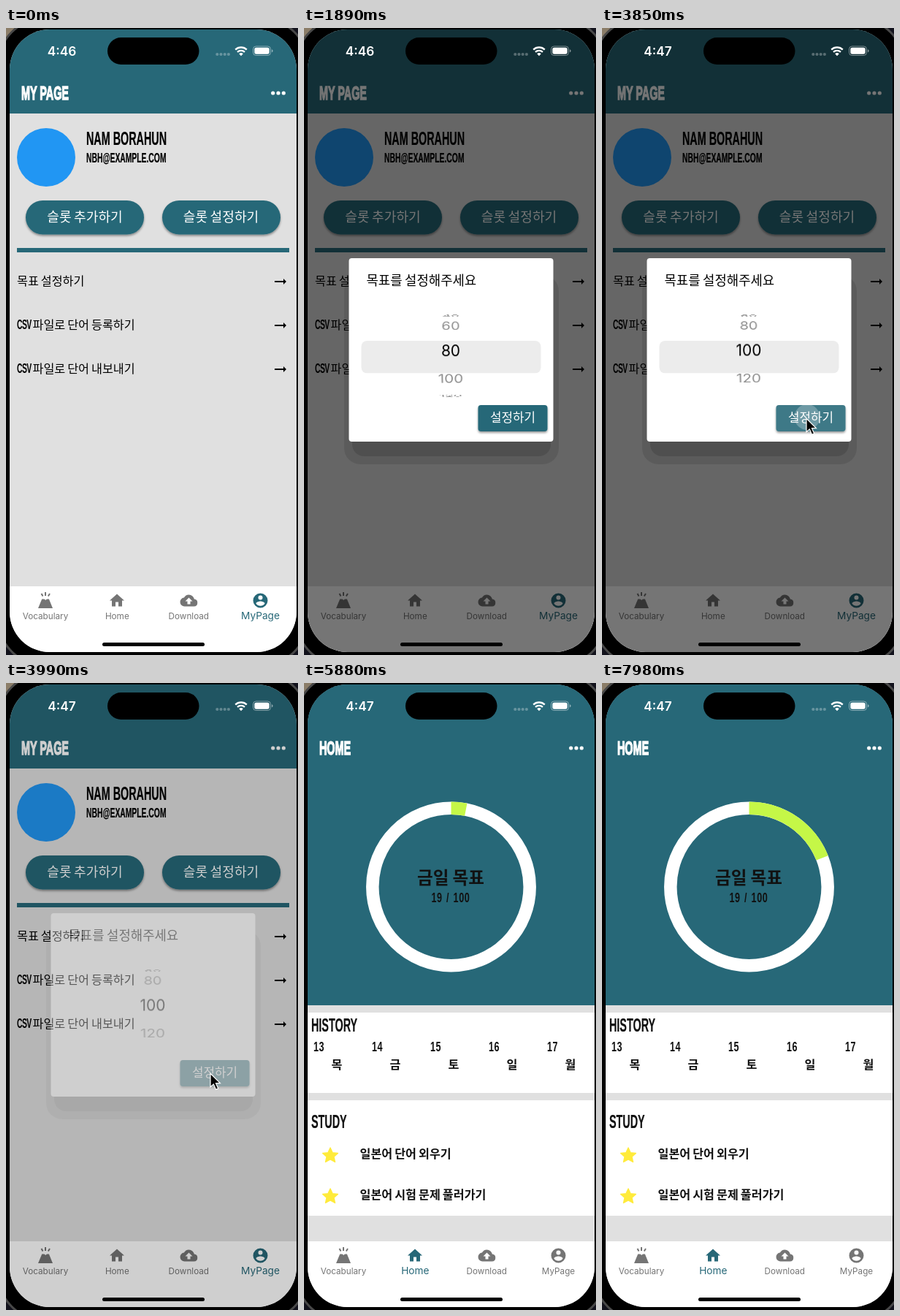
These frames come from a looping animation (400x858 px, 8 s). An HTML page:

```html
<!DOCTYPE html>
<html lang="ko">
<head>
<meta charset="utf-8">
<title>My page</title>
<style>
:root { --teal: #276878; --step: 34.6deg; --r: 66px; }
html, body { margin: 0; width: 100%; height: 100%; overflow: hidden; background: #000; }
.stage { position: absolute; left: 0; top: 0; width: 400px; height: 858px; overflow: hidden; }
.stage svg, .layer { position: absolute; left: 0; top: 0; width: 400px; height: 858px; }
.screen { clip-path: inset(2px 2px 4px 5px round 55px); }

.ko { font-family: "Noto Sans CJK KR", "Noto Sans CJK JP", sans-serif; font-size: 16.2px; word-spacing: -1.5px; }
.ui { font-family: Inter, Roboto, sans-serif; }
/* condensed display face */
.cond {
  font: 700 25px "Liberation Sans", Arial, sans-serif;
  stroke-width: .25px; transform-box: fill-box; transform-origin: 0 0; transform: scaleX(.575);
}
.small { font-size: 18px; }
.tight { letter-spacing: -1px; stroke: none; }
.num { transform: scaleX(.7); letter-spacing: .8px; word-spacing: 2px; stroke: none; }
.title { stroke-width: 1.5px; }
.ink { fill: #000; stroke: #000; }
.white { fill: #fff; stroke: #fff; }
.ko, .ui { stroke: none; }
.mid { text-anchor: middle; }

/* every animation shares one 8 s loop */
.out, .in, .early, .late, .cursor, .touch, .press, .band { animation: 8s step-end infinite; }
.out { animation-name: out; }
.in { animation-name: in; }
.early { animation-name: early; }
.late { animation-name: late; }
.cursor { animation-name: cursor; }
.touch { animation-name: touch; }
.press { animation-name: press; }
.band { animation-name: band; }
@keyframes out { 0% { visibility: visible } 66.6%, 100% { visibility: hidden } }
@keyframes in { 0% { visibility: hidden } 66.6%, 100% { visibility: visible } }
@keyframes early { 0% { visibility: visible } 35%, 100% { visibility: hidden } }
@keyframes late { 0% { visibility: hidden } 35%, 100% { visibility: visible } }
@keyframes cursor { 0% { visibility: hidden } 46.3% { visibility: visible } 50.7%, 100% { visibility: hidden } }
@keyframes touch { 0% { visibility: hidden } 46.3% { visibility: visible } 48.9%, 100% { visibility: hidden } }
@keyframes press { 0% { opacity: 0 } 47.2% { opacity: .11 } 50.8%, 100% { opacity: 0 } }
@keyframes band { 0% { visibility: visible } 48.8%, 100% { visibility: hidden } }

.fade { animation: fade 8s linear infinite; }
@keyframes fade {
  0% { opacity: 0 }
  4.9% { opacity: 0; animation-timing-function: ease-out }
  8.4%, 48.75% { opacity: 1 }
  49.88% { opacity: .35 }
  50.75%, 100% { opacity: 0 }
}

.wheel { position: absolute; left: 101px; top: 450px; width: 200px; height: 0; perspective: 333px; }
.drum { width: 200px; height: 0; transform-style: preserve-3d; animation: spin 8s linear infinite; }
.drum span {
  position: absolute; left: 0; top: -12px; width: 200px; height: 24px;
  font-size: 21px; line-height: 24px; text-align: center; color: #000; backface-visibility: hidden;
  transform: rotateX(calc(var(--i) * -1 * var(--step))) translateZ(var(--r)) translateY(-8.5px);
}
@keyframes spin {
  0%, 20.2% { transform: translateZ(-66px) rotateX(69.2deg) }
  23.6% { transform: translateZ(-66px) rotateX(102.6deg); animation-timing-function: ease-out }
  30.7% { transform: translateZ(-66px) rotateX(173deg) }
  33.4% { transform: translateZ(-66px) rotateX(173deg); animation-timing-function: ease-in-out }
  39.4%, 100% { transform: translateZ(-66px) rotateX(138.4deg) }
}
.veil { position: absolute; left: 79px; width: 245px; height: 44px; background: rgba(255,255,255,.553); }

.tab { fill: #757575; }
.tab text { font-size: 13.7px; transform: scale(.855); }
.home { animation: tint 8s linear infinite; }
.home text { animation: grow 8s linear infinite; }
.me { animation: untint 8s linear infinite; }
.me text { animation: shrink 8s linear infinite; }
@keyframes tint { 0%, 66.6% { fill: #757575 } 69.1%, 100% { fill: #276878 } }
@keyframes untint { 0%, 66.6% { fill: #276878 } 69.1%, 100% { fill: #757575 } }
@keyframes grow { 0%, 66.6% { transform: scale(.855) } 69.1%, 100% { transform: scale(1) } }
@keyframes shrink { 0%, 66.6% { transform: scale(1) } 69.1%, 100% { transform: scale(.855) } }

.ripple { transform-origin: 152.5px 792px; animation: ripple 8s linear infinite; }
@keyframes ripple {
  0%, 57.2% { transform: scale(0); opacity: 1 }
  64.75% { transform: scale(1); opacity: 1 }
  66.6% { transform: scale(1.12); opacity: 1 }
  69%, 100% { transform: scale(1.4); opacity: 0 }
}
.arc { stroke-dasharray: 100 100; animation: arc 8s linear infinite; }
@keyframes arc {
  0% { stroke-dashoffset: 100 }
  66.6% { stroke-dashoffset: 100; animation-timing-function: ease-in-out }
  91.6%, 100% { stroke-dashoffset: 81 }
}
</style>
</head>
<body>
<div class="stage">
  <!-- phone body -->
  <svg viewBox="0 0 400 858">
    <rect width="400" height="858" fill="#12121c"/>
    <path d="M0 0h12L0 14z" fill="#8b7d68"/>
    <rect x="-11" y="-13" width="425" height="885" rx="64" stroke="#484848" stroke-width="3"/>
  </svg>

  <div class="layer screen">
    <svg viewBox="0 0 400 858">
      <defs>
        <filter id="soft" x="-20%" y="-30%" width="140%" height="180%">
          <feDropShadow dx="0" dy="2" stdDeviation="1.5" flood-opacity=".4"/>
        </filter>
        <path id="arrow" d="M0-1h12v-3l4 4-4 4v-3H0z"/>
        <path id="star" fill="#ffeb3b" stroke="#ffeb3b" stroke-width="1.4" stroke-linejoin="round"
          d="M0-10.5L3.1-3.8 10.4-3.1 5 1.8 6.5 9 0 5.3-6.5 9-5 1.8-10.4-3.1-3.1-3.8z"/>
      </defs>
      <rect width="400" height="858" fill="#e0e0e0"/>
      <rect width="400" height="117" fill="var(--teal)"/>

      <g class="out">
        <text class="cond title white" x="21" y="98">MY PAGE</text>
        <circle cx="55" cy="177" r="40" fill="#2196f3"/>
        <g class="ink">
          <text class="cond" x="110" y="160.5">NAM BORAHUN</text>
          <text class="cond small" x="110" y="184">NBH@EXAMPLE.COM</text>
        </g>
        <g fill="var(--teal)">
          <g filter="url(#soft)">
            <rect x="27" y="236" width="162" height="46.5" rx="23.2"/>
            <rect x="214" y="236" width="162" height="46.5" rx="23.2"/>
          </g>
          <rect x="15" y="301" width="373" height="6"/>
        </g>
        <g class="ko mid" fill="#fff" style="font-size:18.1px">
          <text x="108" y="264.5">슬롯 추가하기</text>
          <text x="294.5" y="264.5">슬롯 설정하기</text>
        </g>
        <g class="ko">
          <text x="15" y="352">목표 설정하기</text>
          <text x="36.5" y="412">파일로 단어 등록하기</text>
          <text x="36.5" y="472">파일로 단어 내보내기</text>
        </g>
        <g class="ink">
          <text class="cond small tight" x="15" y="412.5">CSV</text>
          <text class="cond small tight" x="15" y="472.5">CSV</text>
        </g>
        <use href="#arrow" x="368" y="347"/>
        <use href="#arrow" x="368" y="407"/>
        <use href="#arrow" x="368" y="467"/>
      </g>

      <g class="in">
        <rect width="400" height="441" fill="var(--teal)"/>
        <text class="cond title white" x="21" y="98">HOME</text>
        <g fill="none" stroke-width="17.5" transform="rotate(-90 201.5 279)">
          <circle cx="201.5" cy="279" r="107.7" stroke="#fff"/>
          <circle class="arc" cx="201.5" cy="279" r="107.7" pathLength="100" stroke="#c5f747"/>
        </g>
        <path d="M0 451h400v110H0zM0 571h400v158H0z" fill="#fff"/>
        <g fill="#111" stroke="#111">
          <text class="ko mid" x="201" y="275" style="font-size:23.6px;font-weight:700">금일 목표</text>
          <text class="cond small num" x="174.5" y="300">19 / 100</text>
          <text class="cond" x="10" y="477">HISTORY</text>
          <text class="cond" x="10" y="609">STUDY</text>
          <text class="cond small num" x="13" y="504">13</text>
          <text class="cond small num" x="93" y="504">14</text>
          <text class="cond small num" x="173" y="504">15</text>
          <text class="cond small num" x="253" y="504">16</text>
          <text class="cond small num" x="333" y="504">17</text>
          <g class="ko" font-weight="700">
            <text x="37.5" y="528">목</text>
            <text x="117.5" y="528">금</text>
            <text x="197.5" y="528">토</text>
            <text x="277.5" y="528">일</text>
            <text x="357.5" y="528">월</text>
            <text x="76.5" y="650">일본어 단어 외우기</text>
            <text x="76.5" y="706">일본어 시험 문제 풀러가기</text>
          </g>
        </g>
        <use href="#star" x="36" y="646.5"/>
        <use href="#star" x="36" y="702.5"/>
      </g>

      <g fill="#fff">
        <circle cx="365.7" cy="89" r="2.6"/>
        <circle cx="373" cy="89" r="2.6"/>
        <circle cx="380.3" cy="89" r="2.6"/>
      </g>

      <!-- bottom navigation -->
      <rect y="764" width="400" height="94" fill="#fff"/>
      <svg y="764" width="400" height="94" viewBox="0 764 400 94" style="position:static;height:94px">
        <circle class="ripple" cx="152.5" cy="792" r="35" fill="#000" fill-opacity=".045"/>
      </svg>
      <g class="ui mid">
        <g class="tab">
          <path d="M44 794l5.2-12.5h3.3l1.7 1.5 1.7-1.5h3L64 794z"/>
          <path d="M54 772v5M48.5 774l2 3.5M60 774l-2.2 3.5" stroke="#757575" stroke-width="2"/>
          <g transform="translate(54 808.8)"><text>Vocabulary</text></g>
        </g>
        <g class="tab home">
          <path transform="translate(140 771.5)" d="M10 20v-6h4v6h5v-8h3L12 3 2 12h3v8z"/>
          <g transform="translate(152.3 808.8)"><text>Home</text></g>
        </g>
        <g class="tab">
          <path transform="translate(238.5 771.5)" d="M19.35 10.04A7.49 7.49 0 0 0 12 4C9.11 4 6.6 5.64 5.35 8.04A6 6 0 0 0 0 14a6 6 0 0 0 6 6h13a5 5 0 0 0 .35-9.96zM14 13v4h-4v-4H7l5-5 5 5z"/>
          <g transform="translate(250.3 808.8)"><text>Download</text></g>
        </g>
        <g class="tab me">
          <path transform="translate(336.5 771.5)" fill-rule="evenodd" d="M12 2a10 10 0 1 0 0 20 10 10 0 0 0 0-20zm0 3a3 3 0 1 1 0 6 3 3 0 0 1 0-6zm0 14.2a7.2 7.2 0 0 1-6-3.22c.03-1.99 4-3.08 6-3.08s5.97 1.09 6 3.08a7.2 7.2 0 0 1-6 3.22z"/>
          <g transform="translate(348.5 808.8)"><text>MyPage</text></g>
        </g>
      </g>
    </svg>

    <div class="layer fade" style="background:rgba(0,0,0,.54)"></div>

    <!-- goal dialog -->
    <div class="layer fade">
      <svg viewBox="0 0 400 858">
        <rect x="55" y="338" width="294" height="259" rx="22" fill-opacity=".1"/>
        <rect x="66" y="340" width="272" height="246" rx="16" fill-opacity=".13"/>
        <rect x="61.5" y="315" width="280" height="251" rx="4" fill="#fff"/>
        <text class="ko" x="85.5" y="351.5" style="font-size:17.8px">목표를 설정해주세요</text>
        <rect class="band" x="78.5" y="428" width="246" height="44.5" rx="8" fill="#ececec"/>
        <rect x="238.5" y="516" width="95" height="36" rx="4" fill="var(--teal)" filter="url(#soft)"/>
        <rect class="press" x="238.5" y="516" width="95" height="36" rx="4" fill="#fff"/>
        <text class="ko mid" x="286" y="538.8" fill="#fff" style="font-size:16.9px">설정하기</text>
      </svg>
      <div class="wheel ui">
        <div class="drum">
          <span style="--i:0">20</span>
          <span style="--i:1">40</span>
          <span style="--i:2">60</span>
          <span style="--i:3">80</span>
          <span style="--i:4">100</span>
          <span style="--i:5">120</span>
        </div>
      </div>
      <div class="veil" style="top:384px"></div>
      <div class="veil" style="top:472px"></div>
    </div>
  </div>

  <!-- status bar, home indicator, pointer -->
  <svg viewBox="0 0 400 858">
    <rect x="139" y="13" width="125.5" height="37" rx="18.5"/>
    <rect x="132" y="841" width="140" height="5" rx="2.5"/>
    <g class="ui mid" fill="#fff" font-size="17.3" font-weight="600">
      <text class="early" x="76.5" y="37.7">4:46</text>
      <text class="late" x="76.5" y="37.7">4:47</text>
    </g>
    <g fill="#fff">
      <g fill-opacity=".3">
        <circle cx="289.3" cy="36" r="2.1"/>
        <circle cx="294.5" cy="36" r="2.1"/>
        <circle cx="299.7" cy="36" r="2.1"/>
        <circle cx="304.9" cy="36" r="2.1"/>
      </g>
      <path d="M314.2 29.6a11.3 11.3 0 0 1 15.6 0M317 32.8a7.2 7.2 0 0 1 10 0" fill="none" stroke="#fff" stroke-width="2.3"/>
      <path d="M319.2 35.3a4 4 0 0 1 5.6 0L322 38.2z"/>
      <rect x="338.5" y="25" width="24" height="12.5" rx="4" fill="none" stroke="#fff" stroke-opacity=".45"/>
      <rect x="340.3" y="26.8" width="20.4" height="8.9" rx="2.6"/>
      <path d="M364 29.2a2.2 2.2 0 0 1 0 4.2z" fill-opacity=".5"/>
    </g>
    <circle class="touch" cx="281" cy="532.5" r="17.5" fill="#fff" fill-opacity=".25"/>
    <path class="cursor" transform="translate(280 534.3)" d="M0 0v18.5l4.3-3.9 3.2 7.4 3.2-1.4-3.2-7.2h5.9z" stroke="#fff" stroke-width="1.2"/>
  </svg>
</div>
</body>
</html>
```
